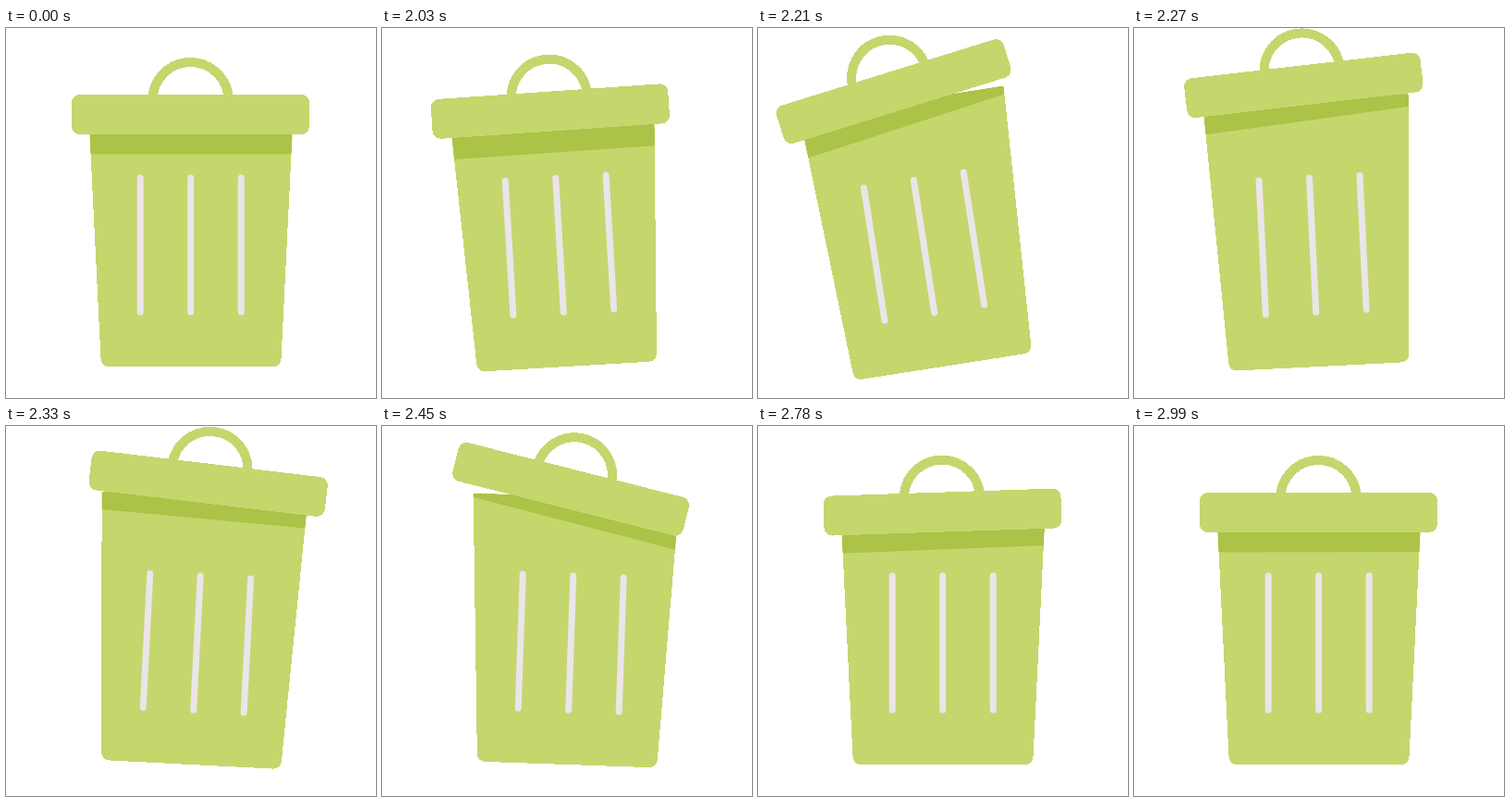
An HTML page for the animation above (3020 ms loop, 400 by 400 pixels).

```html
<!DOCTYPE html>
<html lang="en">
<head>
<meta charset="utf-8">
<title>Shaking bin</title>
<style>
html, body { margin: 0; height: 100%; overflow: hidden; background: #fff; }
svg { display: block; width: 100%; height: 100%; }
</style>
</head>
<body>
<svg viewBox="0 0 400 400" fill="#c5d66d">
  <clipPath id="inside"><use href="#shell"/></clipPath>
  <g id="bin">
    <path id="shell" shape-rendering="crispEdges" d="M90.5 76.3H309.5q1.9 0 1.8 2L297.6 357q-.5 9-9.5 9H112q-9 0-9.5-9L88.7 78.3q-.1-2 1.8-2Z"/>
    <g clip-path="url(#inside)"><path id="shade" fill="#abc346" d="M50 0H350V136.4H50Z"/></g>
    <path d="M145.2 162V307M199.7 162V307M254.2 162V307" stroke="#ebe5ea" stroke-width="7" stroke-linecap="round"/>
    <g id="lid" shape-rendering="crispEdges">
      <path d="M158.5 78a41 41 0 0 1 82 0" fill="none" stroke="#c5d66d" stroke-width="10"/>
      <rect x="71" y="72" width="257" height="43" rx="9"/>
    </g>
  </g>
</svg>
<script>
const LOOP = 3020, START = 2030, STEP = 30;
const el = id => document.getElementById(id);

// Returns a function of time that eases in and out between [time, value] stops
function swing(...stops) {
  return time => {
    const next = stops.findIndex(stop => stop[0] > time);
    if (next < 1) return 0;
    const [t0, v0] = stops[next - 1], [t1, v1] = stops[next];
    const u = (time - t0) / (t1 - t0);
    return v0 + (v1 - v0) * u * u * (3 - 2 * u);
  };
}

// The first swings are already under way when the shake cuts in at START
const binTurn = swing([1925, 0], [2187, -9.6], [2350, 3.5], [2570, 0]);
const lidTurn = swing([2000, 0], [2195, -8.6], [2435, 12.4], [2660, -2.6], [3010, 0]);
const lidX = swing([1960, 0], [2200, -6.5], [2330, 3.5], [2470, -6.2], [2800, 0]);
const lidY = swing([1965, 0], [2260, -32], [2290, -32.3], [2815, 0]);
const shadeTurn = swing([2000, 0], [2200, -9.2], [2450, 12.6], [2640, -3.3], [3010, 0]);
const shadeY = swing([1990, 0], [2260, -36.5], [2310, -36.5], [2880, 0]);

function place(id, x, y, turn, pivot) {
  el(id).setAttribute("transform", `translate(${x} ${y}) rotate(${turn} ${pivot})`);
}

function draw() {
  const now = performance.now() % LOOP;
  const time = now < START ? 0 : now - (now - START) % STEP;
  place("bin", 0, 0, binTurn(time), "200 365");
  place("lid", lidX(time), lidY(time), lidTurn(time), "199.5 93.5");
  place("shade", 0, shadeY(time), shadeTurn(time), "200 136.4");
  requestAnimationFrame(draw);
}
draw();
</script>
</body>
</html>
```
